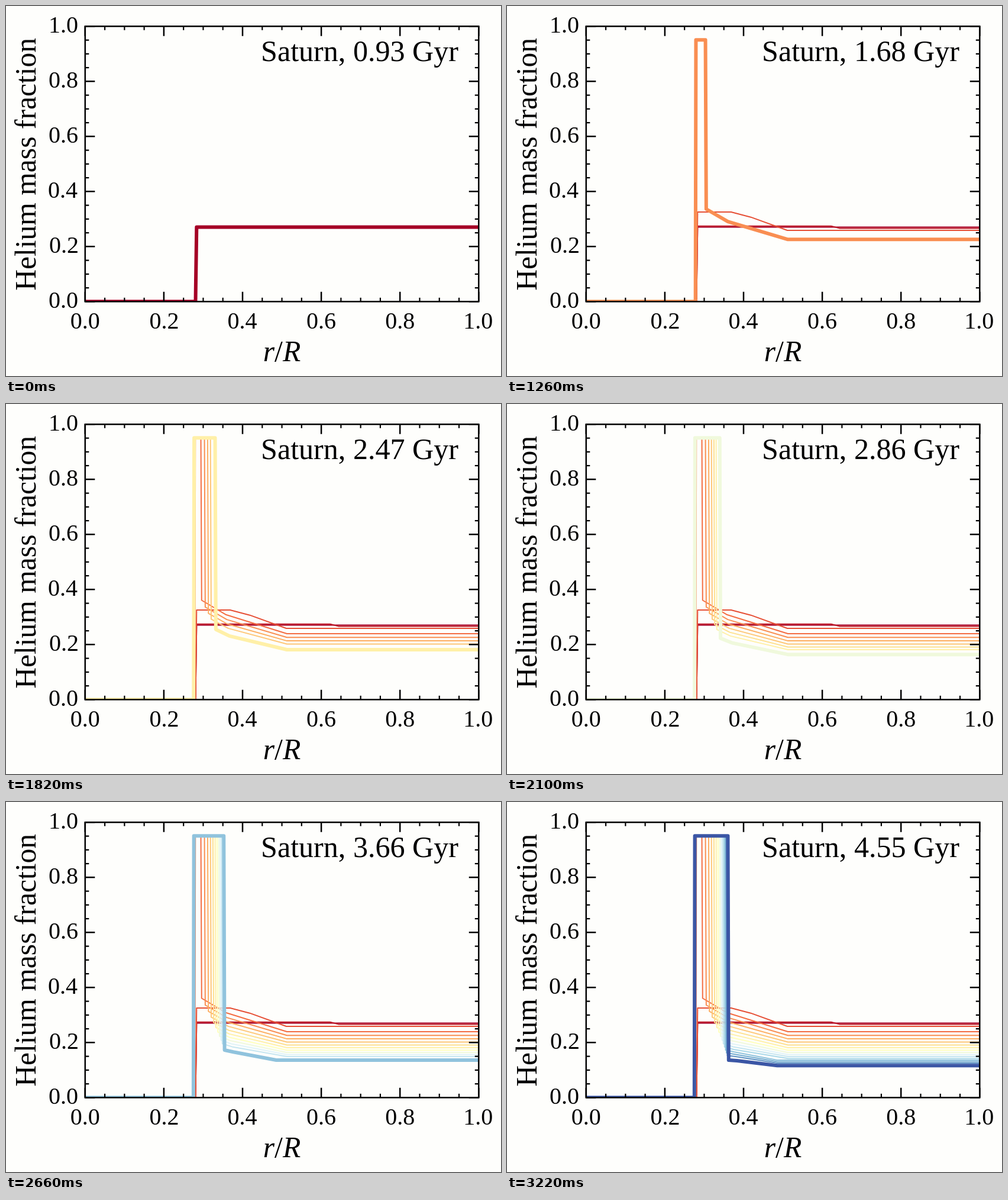
Animation, 837 px wide and 625 px high, one loop 5.74 s. Source, as an HTML page:

```html
<!DOCTYPE html>
<html lang="en">
<head>
<meta charset="utf-8">
<title>Helium mass fraction</title>
<style>
  html, body { margin: 0; width: 100%; height: 100%; overflow: hidden; background: #fefefc; }
  svg { display: block; width: 837px; height: 625px; }
  text { font-family: "Liberation Serif", "Times New Roman", serif; font-kerning: none; fill: #000; }
  .num { font-size: 40px; }
  .big { font-size: 49.6px; }
  .curve { fill: none; stroke-linejoin: round; }
  .axis { fill: none; stroke: #000; stroke-width: 2.5; }
  .minor { stroke-width: 2.2; }
</style>
</head>
<body>
<svg viewBox="0 0 837 625">
  <defs><clipPath id="plot"><rect x="133.8" y="34.3" width="665.5" height="465"/></clipPath></defs>
  <g id="curves" clip-path="url(#plot)"></g>
  <g id="axes"></g>
  <text id="title" x="765" y="92.8" text-anchor="end" style="font-size:50.1px"></text>
  <text class="big" text-anchor="middle" transform="translate(50 267.4) rotate(-90)">Helium mass fraction</text>
  <text class="big" x="434.8" y="600" font-style="italic">r<tspan font-style="normal">/</tspan>R</text>
</svg>
<script>
const LEFT = 133.8, RIGHT = 799.3, TOP = 34.3, BOTTOM = 499.3;
const LOOP = 5740, HOLD = 840, STEP = 140, LAST = 18, PEAK = 57.2;
const RAMP = "a50026 d73027 f46d43 fdae61 fee090 ffffbf e0f3f8 abd9e9 74add1 4575b4 313695".split(" ");

const lerp = (a, b, f) => a + (b - a) * f;
// Fast start, slow end; runs from 0 to 1
const settle = (u, rate) => (1 - Math.exp(-rate * u)) / (1 - Math.exp(-rate));

const svgNode = (tag, attrs, parent) => {
  const node = document.createElementNS("http://www.w3.org/2000/svg", tag);
  for (const key in attrs) node.setAttribute(key, attrs[key]);
  return parent.appendChild(node);
};

// Age in Gyr: slow first step, then nearly even steps that lengthen late on
function age(k) {
  if (k < 2) return 0.93 + 0.06 * k;
  const n = k - 4;
  return 1.68 + 0.1965 * n + 0.0085 * Math.max(0, n - 7.3) ** 2 / 3.14;
}

function colour(k) {
  const u = (k < 2 ? k : k + 1) / 2, i = Math.floor(u);
  const mix = c => {
    const [a, b] = [RAMP[i], RAMP[i + 1]].map(hex => parseInt(hex.slice(c, c + 2), 16));
    return Math.round(lerp(a, b, u - i));
  };
  return `rgb(${mix(0)},${mix(2)},${mix(4)})`;
}

// A helium plateau above the core, with a slope from x1,y1 down to x2,y2
function plateau(y1, x1, x2, y2, bend) {
  const rise = [[320.5, BOTTOM], [322.3, y1], [x1, y1]];
  return [...rise, [lerp(x1, x2, 0.35), lerp(y1, y2, 0.35 - bend)], [x2, y2]];
}

// A helium shell on the core that widens while the envelope drains
function shell(k) {
  const u = (k - 3) / (LAST - 3), drain = settle(u, 1.2);
  const inner = 317.2 + 2.6 * Math.exp(-(k - 3) / 3);
  const edge = lerp(329.5, 373.5, settle(u, 1.85));
  const foot = lerp(331.5, 436, drain), level = lerp(388, 445.3, drain);
  const knee = [369 + 1.1 * k, lerp(foot, level, 0.5 - 0.022 * k)];
  return [[inner - 0.4, BOTTOM], [inner + 0.4, PEAK], [edge, PEAK], [edge + 1.3, foot],
    knee, [k < 14 ? 475 : 457, level]];
}

function profile(k) {
  if (k === 0) return plateau(373.5, 548, 562, 373.5, 0);
  if (k === 1) return plateau(371.7, 548, 562, 375.4, 0);
  if (k === 2) return plateau(348, 379, 474, 379, 0.07);
  return shell(k);
}

const pen = document.createElement("canvas").getContext("2d");
pen.font = '40px "Liberation Serif", "Times New Roman", serif';

// Labels are placed by their ink, not by their advance width
function number(value, x, y, align, parent) {
  const label = value.toFixed(1), ink = pen.measureText(label);
  const right = ink.actualBoundingBoxRight, left = -ink.actualBoundingBoxLeft;
  const shift = align === "end" ? right : (left + right) / 2;
  svgNode("text", { class: "num", x: x - shift, y }, parent).textContent = label;
}

function drawAxes() {
  const g = document.getElementById("axes");
  let major = "", minor = "";
  for (let i = 0; i <= 20; i++) {
    const x = lerp(LEFT, RIGHT, i / 20), y = lerp(BOTTOM, TOP, i / 20);
    const big = i % 4 === 0, len = big ? 16.5 : 6.5;
    const ticks = `M${x} ${TOP}v${len}M${x} ${BOTTOM}v${-len}M${LEFT} ${y}h${len}M${RIGHT} ${y}h${-len}`;
    if (!big) { minor += ticks; continue; }
    major += ticks;
    number(i / 20, x, 545.2, "middle", g);
    number(i / 20, 121, y + 11, "end", g);
  }
  svgNode("path", { class: "axis minor", d: minor }, g);
  svgNode("path", { class: "axis", d: major }, g);
  svgNode("rect", { class: "axis", x: LEFT, y: TOP, width: RIGHT - LEFT, height: BOTTOM - TOP }, g);
}

drawAxes();
const curveGroup = document.getElementById("curves");
const title = document.getElementById("title");
const curves = Array.from({ length: LAST + 1 }, (_, k) => {
  const points = profile(k), level = points[points.length - 1][1];
  const d = "M" + [[LEFT, BOTTOM], ...points, [RIGHT + 4, level]].join("L");
  return svgNode("path", { class: "curve", d, stroke: colour(k) }, curveGroup);
});

let shown = -1;
function show(now) {
  const t = now % LOOP;
  const k = t < HOLD ? 0 : Math.min(LAST, 1 + Math.floor((t - HOLD) / STEP));
  if (k === shown) return;
  shown = k;
  title.textContent = `Saturn, ${age(k).toFixed(2)} Gyr`;
  // The trail of thin lines stays one step behind the bold curve
  curves.forEach((c, i) => {
    c.style.display = i === k || i < k - 1 ? "" : "none";
    c.style.strokeWidth = i === k ? 6 : 2;
  });
}

const start = performance.now();
function tick() {
  show(performance.now() - start);
  requestAnimationFrame(tick);
}
tick();
</script>
</body>
</html>
```
